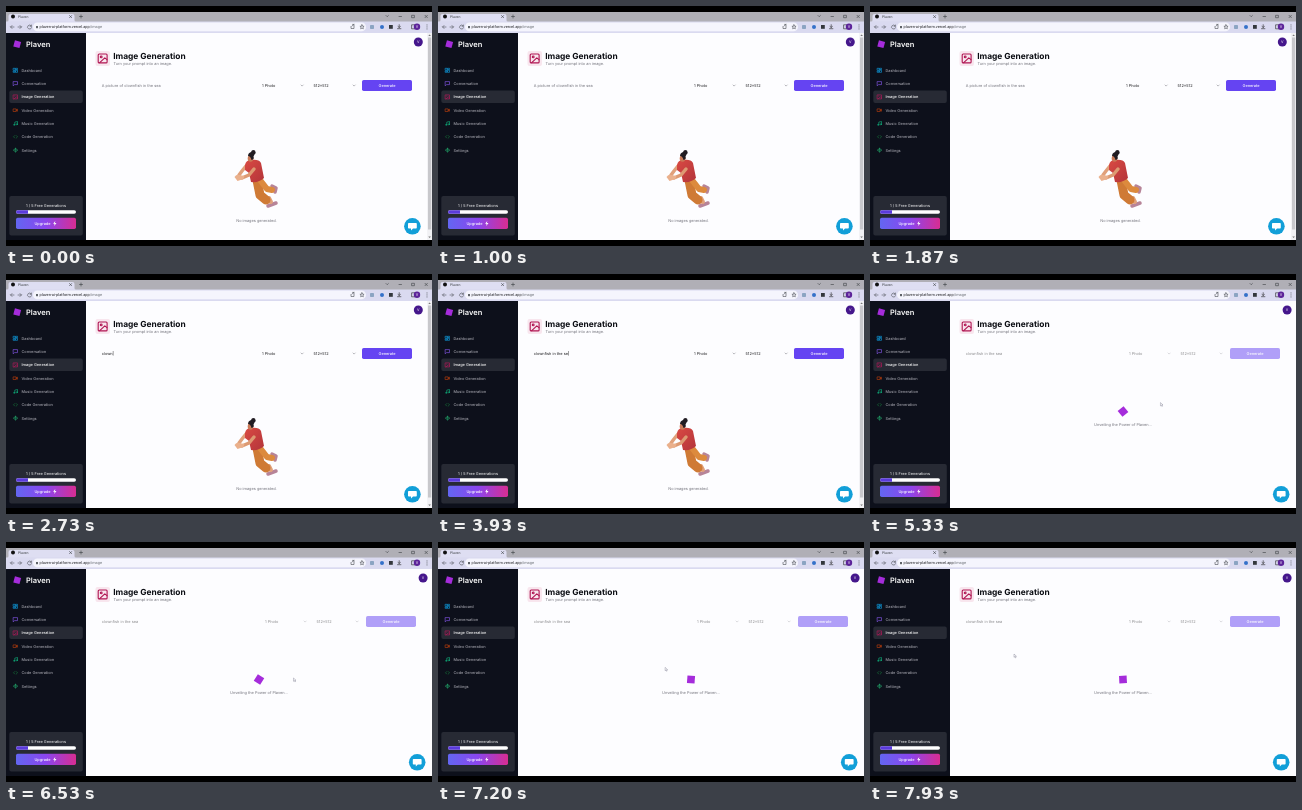
An HTML page for the animation above (8 s loop, 426 px wide and 240 px high).

```html
<!DOCTYPE html>
<html lang="en">
<head>
<meta charset="utf-8">
<title>Image Generation</title>
<style>
  html, body { margin: 0; width: 100%; height: 100%; overflow: hidden; background: #000; }
  svg { display: block; width: 100vw; height: 100vh; }
  text { font: 3.88px Inter, sans-serif; white-space: pre; text-rendering: geometricPrecision; }
  .mid { text-anchor: middle; }
  .muted { fill: #71717a; }
  .white { fill: #fff; }
  .chrome { font: 3.9px Roboto, sans-serif; }
  .line { fill: none; stroke-width: .6; stroke-linecap: round; stroke-linejoin: round; }
</style>
</head>
<body>
<svg viewBox="0 0 426 240">
  <defs>
    <linearGradient id="upgrade">
      <stop offset="0" stop-color="#6366f1"/>
      <stop offset=".5" stop-color="#8b45ee"/>
      <stop offset="1" stop-color="#d82d92"/>
    </linearGradient>
    <linearGradient id="shirt" x2="1" y2="1">
      <stop offset="0" stop-color="#d94a43"/>
      <stop offset="1" stop-color="#b3343a"/>
    </linearGradient>
  </defs>

  <!-- Browser -->
  <rect y="6" width="426" height="10" fill="#b0afb6"/>
  <path d="M1 16q1.500 0 1.500-2v-4q0-2 2-2h62q2 0 2 2v4q0 2 1.500 2z" fill="#dedef2"/>
  <circle cx="7" cy="10.600" r="2" fill="#111"/>
  <text class="chrome" x="12" y="12" fill="#3c4043" style="font-size:3.500px">Plaven</text>
  <g class="line" stroke="#3c4043">
    <path d="M63.500 9.500l2.200 2.200m0-2.200l-2.200 2.200M73.500 10.500h3m-1.500-1.500v3M380 9.500l1.200 1.200 1.200-1.200M393 10.500h2.500M406 9.300h2.400v2.400h-2.400zM419 9.300l2.400 2.400m0-2.400l-2.400 2.400"/>
  </g>
  <rect y="15.500" width="426" height="11.500" fill="#dadaf0"/>
  <rect x="27" y="16.500" width="333" height="8.800" rx="4.400" fill="#f5f5fd"/>
  <g class="line" stroke="#4c5056">
    <path d="M8 21H4.500l1.500-1.500M4.500 21l1.500 1.500M12 21h3.500l-1.500-1.500m1.500 1.500l-1.500 1.500M25.300 20a2 2 0 1 0 .2 1.700m-.1-2.700v1.300h-1.300"/>
    <path d="M345 20.500v2h3v-2m-2-.5l2-1.500m-1.500-.1h1.500v1.400M356 18.800l.6 1.400 1.500.1-1.100 1 .3 1.500-1.300-.8-1.300.8.300-1.500-1.100-1 1.500-.1z"/>
    <path d="M406.500 18.800h3.300v4h-3.300zM392 22.700h3.400m-1.700-4v2.800l-1.200-1m1.200 1l1.200-1" stroke="#222" transform="translate(-.5)"/>
  </g>
  <rect x="30" y="20" width="2" height="2.200" fill="#5f6368"/>
  <text class="chrome" x="33.500" y="22.300" fill="#202124">plaven-ai-platform.vercel.app<tspan fill="#6b7075">/image</tspan></text>
  <rect x="364" y="19" width="4" height="4" rx=".8" fill="#8ba4c2"/>
  <circle cx="376" cy="21" r="2" fill="#3471c9"/>
  <rect x="383" y="19" width="3.800" height="3.800" fill="#33373c"/>
  <circle cx="411" cy="20.800" r="3.200" fill="#5c2399"/>
  <text class="chrome mid white" x="411" y="22.100">V</text>
  <path d="M421 18.900v.1m0 1.900v.1m0 1.900v.1" class="line" stroke="#5f6368" style="stroke-width:1"/>

  <!-- Page -->
  <rect y="27" width="426" height="207" fill="#fdfdff"/>
  <rect y="27" width="80" height="207" fill="#0d101b"/>
  <rect x="8" y="35" width="6.400" height="6.400" fill="#a52cdb" transform="rotate(15 11.200 38.200)"/>
  <text class="white" x="20" y="40.700" style="font-size:7.500px;font-weight:600">Plaven</text>
  <rect x="3.300" y="84.500" width="73.500" height="12.500" rx="2" fill="#272a34"/>
  <g id="menu"></g>

  <rect x="3.300" y="190" width="73.500" height="39.500" rx="2" fill="#272a34"/>
  <text class="mid white" x="40" y="200.800">1 / 5 Free Generations</text>
  <rect x="10" y="204.300" width="60" height="3.500" rx="1.750" fill="#fff"/>
  <path d="M22 204.300H11.750a1.750 1.750 0 0 0 0 3.500H22z" fill="#5b3bdc"/>
  <rect x="10" y="211.800" width="60" height="11.200" rx="1.700" fill="url(#upgrade)"/>
  <text class="mid white" x="36.500" y="218.900" style="font-weight:500">Upgrade</text>
  <path d="M49.300 215l-2.200 2.800h1.500l-.4 2.200 2.300-2.900h-1.600z" fill="#fff"/>

  <rect x="89.500" y="45" width="14.500" height="15" rx="2" fill="#f8e6ee"/>
  <g class="line" stroke="#b01552" style="stroke-width:1.100">
    <rect x="92.200" y="48" width="8.900" height="8.900" rx="1"/>
    <circle cx="95.200" cy="50.900" r=".9"/>
    <path d="M101 53.700l-2.200-1.900-5.100 4.800"/>
  </g>
  <text x="107.200" y="53" fill="#0b0d13" style="font-size:8.400px;font-weight:700">Image Generation</text>
  <text class="muted" x="107.500" y="59.300">Turn your prompt into an image.</text>

  <text id="prompt" x="95.800" y="80.800"></text>
  <rect id="caret" y="77" width=".4" height="4.600" fill="#111"/>
  <g id="photos">
    <text x="256" y="80.800" fill="#18181b">1 Photo</text>
    <path class="line" d="M295 79l1.100 1.100 1.100-1.100" stroke="#8b8b92"/>
  </g>
  <g id="size">
    <text x="307.500" y="80.800" fill="#18181b">512×512</text>
    <path class="line" d="M347 79l1.100 1.100 1.100-1.100" stroke="#8b8b92"/>
  </g>
  <g id="generate">
    <rect x="356" y="74" width="50" height="11" rx="1.700" fill="#6544f2"/>
    <text class="mid white" x="381" y="80.900" style="font-weight:500">Generate</text>
  </g>

  <g id="empty">
    <g stroke-linecap="round" stroke-linejoin="round" fill="none">
      <path d="M266 180l4 2-1 4M262 200l8-3" stroke="#b78498" stroke-width="3.500"/>
      <path d="M263 192l2 4" stroke="#e0a07a" stroke-width="4"/>
      <path d="M251 174l3 15 6 5" stroke="#cf7a35" stroke-width="9"/>
      <path d="M254 174l7 9 5 1" stroke="#dc8a3d" stroke-width="6"/>
      <path d="M240 160l-4 5-3 4" stroke="#e0a07a" stroke-width="3.500"/>
    </g>
    <path d="M239 159q1-5 6-5 8-1 10 3l3 15q-5 5-13 4l-2-9-4-3z" fill="url(#shirt)"/>
    <path d="M248 163l-5 6-7 3" fill="none" stroke="#dd9a72" stroke-width="3.500" stroke-linecap="round" stroke-linejoin="round"/>
    <path d="M228.500 171q2-3 5-2l5 1-1 3-6 2z" fill="#eab08c"/>
    <ellipse cx="244.500" cy="152.500" rx="2.800" ry="3.200" fill="#c97a58"/>
    <path d="M242 150q0-3 3-4 1-3 4-1.500 1.500 2-.5 4l-1 2q1 3-2 3.500-1-4-3.500-4z" fill="#211c22"/>
    <text class="mid muted" x="250.500" y="215.500">No images generated.</text>
  </g>
  <g id="loading">
    <rect id="spinner" x="-3.800" y="-3.800" width="7.600" height="7.600" fill="#a52cdb"/>
    <text class="mid muted" x="253" y="151.500">Unveiling the Power of Plaven...</text>
  </g>

  <g id="corner">
    <circle cx="412.300" cy="36" r="4.500" fill="#45178c"/>
    <text class="mid white" x="412.300" y="37.300" style="font-size:3.600px">V</text>
    <circle cx="406.400" cy="220.300" r="8.300" fill="#129fd8"/>
    <path d="M402.800 217h7.200q.8 0 .8.800v4q0 .8-.8.800h-3l-2 1.800v-1.800h-2.200q-.8 0-.8-.8v-4q0-.8.800-.8z" fill="#fff"/>
  </g>
  <g id="scrollbar">
    <rect x="421.200" y="27" width="4.800" height="207" fill="#f1f1f4"/>
    <rect x="422" y="31.500" width="3.200" height="192" fill="#c8c8cc"/>
    <path d="M422.300 30l1.300-1.500 1.300 1.500zM422.300 230.500l1.300 1.500 1.300-1.500z" fill="#777"/>
  </g>
  <path id="pointer" d="M0 0v3.300l.8-.7.600 1.300.6-.3-.6-1.300h1.100z" fill="#fff" stroke="#66667c" stroke-width=".35"/>
</svg>
<script>
const LOOP = 8000, TYPE_START = 2190, KEY_MS = 91, SUBMIT = 4800;
const PLACEHOLDER = 'A picture of clownfish in the sea';
const PROMPT = 'clownfish in the sea';
const el = id => document.getElementById(id);

// Icons are drawn in a 4 x 4 box.
const menu = [
  ['Dashboard', '#0ea5e9', 'M0 0h1.600v2H0zM2.400 0H4v1.200H2.400zM0 2.800h1.600V4H0zM2.400 2H4v2H2.400z'],
  ['Conversation', '#8b5cf6', 'M0 0h4v3H1L0 4z'],
  ['Image Generation', '#be185d', 'M0 0h4v4H0zM.5 4L2.800 2 4 3M1.200 1.200h.1'],
  ['Video Generation', '#c2410c', 'M0 .7h2.700v2.600H0zM2.700 1.700L4 1v2l-1.300-.7'],
  ['Music Generation', '#10b981', 'M1.300 3.300V.6L4 0v2.800M1.300 3.300a.6.6 0 1 1-1.200 0 .6.6 0 0 1 1.200 0M4 2.800a.6.6 0 1 1-1.200 0 .6.6 0 0 1 1.200 0'],
  ['Code Generation', '#15803d', 'M1.200.8L0 2l1.200 1.200M2.800.8L4 2 2.800 3.200'],
  ['Settings', '#22a66b', 'M2 .4a1.600 1.600 0 1 0 .1 0M2 1.500a.5.5 0 1 0 .1 0M2 0v.4M2 3.600V4M0 2h.4M3.600 2H4']
];
el('menu').innerHTML = menu.map(([label, color, icon], i) => {
  const y = 64.300 + i * 13.300;
  return `<path class="line" d="${icon}" stroke="${color}" transform="translate(7.500 ${y - 2})"/>
    <text x="15.500" y="${y + 1.400}" fill="${i === 2 ? '#fff' : '#a1a1aa'}" style="font-weight:500">${label}</text>`;
}).join('');

const pointerPath = [
  [4150, 270, 96], [4650, 380, 80], [4850, 380, 80], [5250, 290.500, 128.500],
  [6530, 287.500, 136], [6800, 287, 135], [7700, 144, 112], [LOOP, 144, 112]
];
function pointerAt(t) {
  const i = Math.max(1, pointerPath.findIndex(p => p[0] >= t));
  const [t0, x0, y0] = pointerPath[i - 1], [t1, x1, y1] = pointerPath[i];
  const p = (t - t0) / (t1 - t0), e = p * p * (3 - 2 * p);
  return [x0 + (x1 - x0) * e, y0 + (y1 - y0) * e];
}

const show = (id, on) => el(id).style.display = on ? '' : 'none';
const shift = (id, x) => el(id).setAttribute('transform', `translate(${x})`);

function draw(t) {
  const busy = t >= SUBMIT;
  const count = Math.max(0, Math.min(PROMPT.length, Math.floor((t - TYPE_START) / KEY_MS)));
  const prompt = el('prompt');
  prompt.textContent = count ? PROMPT.slice(0, count) : PLACEHOLDER;
  prompt.setAttribute('fill', count ? '#18181b' : '#71717a');

  show('caret', count > 0 && t < 4500);
  el('caret').setAttribute('x', 96 + (count ? prompt.getComputedTextLength() : 0));

  // The page widens when its scrollbar disappears.
  shift('photos', busy ? 3 : 0);
  shift('size', busy ? 3 : 0);
  shift('generate', busy ? 4 : 0);
  shift('corner', busy ? 4.800 : 0);
  for (const id of ['prompt', 'photos', 'size', 'generate']) el(id).style.opacity = busy ? .5 : 1;
  show('empty', !busy);
  show('scrollbar', !busy);
  show('loading', busy);
  el('spinner').setAttribute('transform', `translate(253 137.500) rotate(${(t - 7940) * .36})`);

  const pointing = t >= pointerPath[0][0];
  show('pointer', pointing);
  if (pointing) el('pointer').setAttribute('transform', `translate(${pointerAt(t)})`);
}

function tick() {
  draw(performance.now() % LOOP);
  requestAnimationFrame(tick);
}
tick();
</script>
</body>
</html>
```
